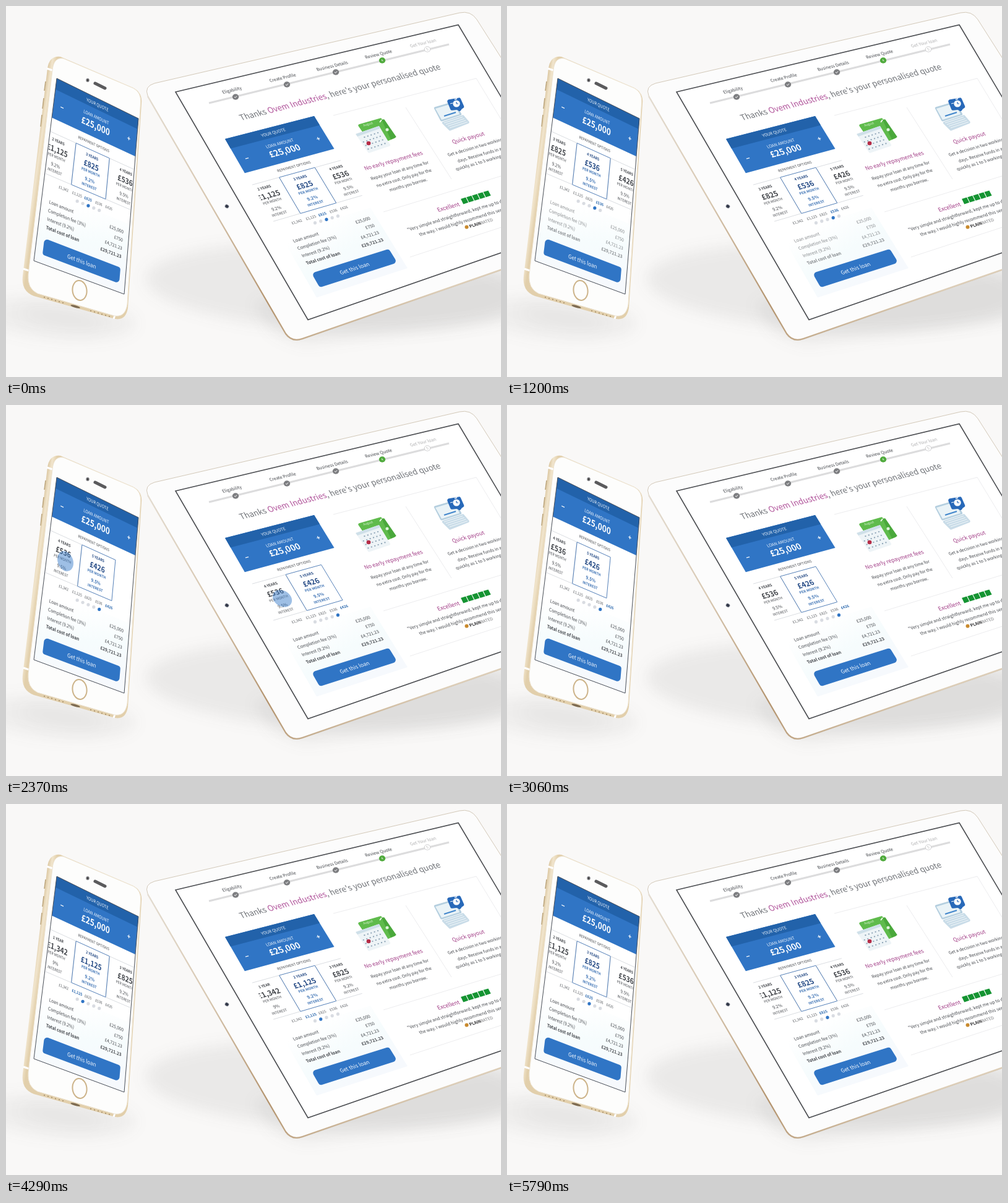
An HTML page with a canvas for the animation above (5.82 s loop, 800x600 px).

```html
<!DOCTYPE html>
<html lang="en">
<head>
<meta charset="utf-8">
<title>Loan quote on two devices</title>
<style>
html, body { margin: 0; width: 100%; height: 100%; overflow: hidden; background: #f9f8f7; }
canvas { display: block; width: 800px; height: 600px; }
</style>
</head>
<body>
<canvas id="stage" width="800" height="600"></canvas>
<script>
const FONT = '"Noto Sans CJK SC", "Noto Sans CJK JP", "Noto Sans CJK", Lato, sans-serif';
const LOOP = 5820, W = 300, H = 534, PITCH = 120, MID = 152;
const BLUE = '#3075c5', DEEP = '#2262aa', INK = '#44474c', PURPLE = '#a03a84';
const view = document.getElementById('stage').getContext('2d');
const layer = document.createElement('canvas');
layer.width = 800;
layer.height = 600;
let g = layer.getContext('2d');

// Corners run clockwise from the top left of each quote card.
const phone = [[82, 117], [214, 182], [191, 466], [45, 412]];
const tablet = [[354, 215], [498, 178], [649, 424], [502, 471.6]];

const options = [
  ['1 YEAR', '£1,342', '9%'], ['2 YEARS', '£1,125', '9.2%'], ['3 YEARS', '£825', '9.2%'],
  ['4 YEARS', '£536', '9.5%'], ['5 YEARS', '£426', '9.5%']
];
const costs = [
  ['Loan amount', '£25,000'], ['Completion fee (3%)', '£750'],
  ['Interest (9.2%)', '£4,721.23'], ['Total cost of loan', '£29,721.23']
];
const priceAt = [68, 115, 153, 190, 225];
const swipes = [
  { at: 60, from: 2, to: 3, reach: 95, touch: 159 },
  { at: 1500, from: 3, to: 4, reach: 95, touch: 159 },
  { at: 3060, from: 4, to: 1, reach: 170, touch: 75 },
  { at: 4410, from: 1, to: 2, reach: 95, touch: 159 }
];

const clamp = x => Math.max(0, Math.min(1, x));
const ramp = (t, a, b) => clamp((t - a) / (b - a));

// Affine frame of a bilinear card around (u, v).
function local([a, b, c, d], u, v) {
  const s = u / W, t = v / H;
  const axis = i => {
    const k = a[i] - b[i] + c[i] - d[i];
    return {
      p: a[i] + s * (b[i] - a[i]) + t * (d[i] - a[i]) + s * t * k,
      du: (b[i] - a[i] + t * k) / W,
      dv: (d[i] - a[i] + s * k) / H
    };
  };
  const x = axis(0), y = axis(1);
  return [x.du, y.du, x.dv, y.dv, x.p, y.p];
}

const at = (dev, u, v) => local(dev, u, v).slice(4);
const box = (dev, u0, v0, u1, v1) =>
  [[u0, v0], [u1, v0], [u1, v1], [u0, v1]].map(([u, v]) => at(dev, u, v));

function trace(pts, r = 0) {
  g.beginPath();
  if (!r) {
    pts.forEach(p => g.lineTo(p[0], p[1]));
  } else {
    const n = pts.length, z = pts[n - 1];
    g.moveTo((z[0] + pts[0][0]) / 2, (z[1] + pts[0][1]) / 2);
    pts.forEach((p, i) => {
      const q = pts[(i + 1) % n];
      g.arcTo(p[0], p[1], q[0], q[1], r);
    });
  }
  g.closePath();
}

function fill(pts, color, r) {
  trace(pts, r);
  g.fillStyle = color;
  g.fill();
}

function outline(pts, color, width = 1) {
  trace(pts);
  g.strokeStyle = color;
  g.lineWidth = width;
  g.stroke();
}

function line(pts, color, width = 1) {
  g.beginPath();
  pts.forEach(p => g.lineTo(p[0], p[1]));
  g.strokeStyle = color;
  g.lineWidth = width;
  g.stroke();
}

function oval(x, y, rx, ry, color, turn = 0) {
  g.beginPath();
  g.ellipse(x, y, rx, ry, turn, 0, 7);
  g.fillStyle = color;
  g.fill();
}

function blend(x0, y0, x1, y1, ...colors) {
  const grad = g.createLinearGradient(x0, y0, x1, y1);
  colors.forEach((c, i) => grad.addColorStop(i / (colors.length - 1), c));
  return grad;
}

// Text lying in a card, centred vertically on (u, v).
function put(dev, text, u, v, size, color, weight = 400, align = 'center') {
  g.save();
  g.transform(...local(dev, u, v));
  g.font = `${weight} ${size}px ${FONT}`;
  g.textAlign = align;
  g.fillStyle = color;
  g.fillText(text, 0, size * 0.36);
  g.restore();
}

// Text lying on the tablet page; parts are [text, color, weight].
function page(parts, x, y, size, slope, align = 'center') {
  if (typeof parts[0] === 'string') parts = [parts];
  g.save();
  const n = Math.hypot(1, slope);
  g.transform(1 / n, slope / n, 0.54, 0.93, x, y);
  g.textAlign = align;
  let pen = 0;
  for (const [text, color, weight = 400] of parts) {
    g.font = `${weight} ${size}px ${FONT}`;
    g.fillStyle = color;
    g.fillText(text, pen, size * 0.36);
    pen += g.measureText(text).width;
  }
  g.restore();
}

function backdrop() {
  g.fillStyle = '#f9f8f7';
  g.fillRect(0, 0, 800, 600);
  g.save();
  g.filter = 'blur(12px)';
  oval(85, 505, 125, 34, 'rgba(70,70,70,.06)', 0.08);
  oval(90, 505, 70, 16, 'rgba(70,70,70,.04)', 0.15);
  oval(530, 455, 305, 70, 'rgba(70,70,70,.08)', 0.05);
  fill([[400, 480], [830, 420], [830, 505], [620, 530], [480, 548], [435, 530]], 'rgba(70,70,70,.07)');
  g.restore();
}

function phoneBody() {
  g.beginPath();
  g.moveTo(67, 101);
  g.quadraticCurveTo(70, 80, 88, 82);
  g.lineTo(205, 132);
  g.quadraticCurveTo(221, 140, 219, 158);
  g.lineTo(197, 488);
  g.quadraticCurveTo(194, 509, 176, 506);
  g.lineTo(45, 469);
  g.quadraticCurveTo(24, 461, 27, 436);
  g.closePath();
  g.fillStyle = blend(42, 270, 56, 272, '#d9c39b', '#f1e5cd', '#e2cfab');
  g.fill();
  line([[66, 101], [75, 104]], '#fff', 3);
  line([[28, 425], [37, 428]], '#fff', 3);
  line([[176, 500], [174, 506]], '#fff', 3);

  g.beginPath();
  g.moveTo(75, 104);
  g.quadraticCurveTo(77, 82, 93, 85);
  g.lineTo(206, 133);
  g.quadraticCurveTo(219, 140, 217.5, 157);
  g.lineTo(196, 482);
  g.quadraticCurveTo(193, 504, 175, 501);
  g.lineTo(51, 465);
  g.quadraticCurveTo(34, 457, 36, 434);
  g.closePath();
  g.fillStyle = '#fdfdfc';
  g.fill();
  g.strokeStyle = '#eee5d4';
  g.lineWidth = 1;
  g.stroke();

  [[64, 122, 62, 137], [61, 149, 59, 166], [58, 176, 56, 195]].forEach(
    ([a, b, c, d]) => line([[a, b], [c, d]], '#bda67d', 1.6));
  g.lineCap = 'round';
  line([[144, 125], [160, 133]], '#5b5b5d', 5);
  g.lineCap = 'butt';
  oval(132, 120, 2.7, 3, '#77777b');
  oval(132, 120, 1.2, 1.3, '#333');
  g.beginPath();
  g.ellipse(119, 460, 11.5, 16, -0.12, 0, 7);
  g.strokeStyle = '#cdb48a';
  g.lineWidth = 2;
  g.stroke();
  for (let i = 0; i < 6; i++) {
    oval(62 + i * 6, 471 + i * 1.8, 1, 1, '#a18a66');
    oval(137 + i * 6, 493 + i * 1.8, 1, 1, '#a18a66');
  }
  oval(112, 486, 8, 1.8, '#7d6b52', 0.28);
  fill(phone, '#fff');
}

function tabletBody() {
  g.beginPath();
  g.moveTo(240, 125);
  g.lineTo(733, 11);
  g.quadraticCurveTo(751, 7, 761, 22);
  g.lineTo(810, 99);
  g.lineTo(810, 424);
  g.lineTo(479, 539);
  g.quadraticCurveTo(462, 545, 452, 530);
  g.lineTo(229, 145);
  g.quadraticCurveTo(223, 130, 240, 125);
  g.fillStyle = '#fcfcfc';
  g.fill();
  g.strokeStyle = '#d3c9b9';
  g.lineWidth = 1;
  g.stroke();
  g.beginPath();
  g.moveTo(229, 146);
  g.lineTo(452, 530);
  g.quadraticCurveTo(462, 544, 479, 538);
  g.lineTo(810, 423);
  g.strokeStyle = blend(230, 140, 640, 530, '#e4ddd2', '#d8c8b2', '#b3936d', '#dccdb7');
  g.lineWidth = 2.3;
  g.stroke();
  oval(357, 324, 3.7, 3.2, '#b9bcc4', 0.5);
  oval(357, 324, 2.8, 2.4, '#333949', 0.5);
  const screen = [[274, 139], [731, 30.5], [812, 167], [812, 395], [488, 507.5]];
  fill(screen, '#fff');
  outline(screen, '#4b4d51', 1.6);
}

function progress() {
  line([[328, 157], [716, 62]], '#dcdcdd', 3);
  const steps = [
    ['Eligability', 365, 136, 371, 147], ['Create Profile', 447, 116, 454, 127],
    ['Business Details', 527, 97, 533, 107], ['Review Quote', 602, 78, 608, 88],
    ['Get Your loan', 674, 60, 681, 70]
  ];
  steps.forEach(([name, x, y, cx, cy], i) => {
    page([name, i > 3 ? '#b0b0b2' : INK, i > 3 ? 400 : 500], x, y, 6.9, -0.24);
    oval(cx, cy, 5.2, 4.7, i > 3 ? '#cfcfd1' : i > 2 ? '#4faa3c' : '#7d7e81');
    if (i > 3) oval(cx, cy, 4.2, 3.7, '#fff');
    if (i > 2) page([String(i + 1), i > 3 ? '#aaa' : '#fff'], cx, cy, 5, -0.24);
    else line([[cx - 2, cy], [cx - 0.5, cy + 1.5], [cx + 2, cy - 1.5]], '#fff', 1);
  });
}

function calendar() {
  fill([[568, 192], [606, 181], [630, 213], [593, 228]], '#5fbb4c', 2);
  fill([[607, 184], [611, 183], [631, 212], [622, 216]], '#4aa83b', 1);
  page(['August', '#dff3da'], 585, 191, 5, -0.28);
  fill([[565, 207], [603, 194], [622, 226], [586, 238]], '#eef4f7', 2);
  fill([[565, 207], [603, 194], [605, 198], [568, 211]], '#cfe0e9');
  for (let r = 0; r < 4; r++) {
    for (let c = 0; c < 6; c++) {
      if (r + c) oval(574 + c * 5.4 + r * 3.8, 214 - c * 1.8 + r * 5.8, 1.2, 1.1, '#8fa5b7');
    }
  }
  oval(586, 222, 3.4, 3.2, '#b52c47');
  oval(616, 200, 2.5, 2.5, '#dff3da');
  line([[604, 188], [607, 184]], '#fff', 1.5);
}

function laptop() {
  fill([[691, 164], [725, 154], [737, 176], [703, 187]], '#b5cfdf', 2);
  fill([[694, 166], [724, 157], [733, 175], [704, 184]], '#eaf3f7');
  line([[708, 178], [727, 172]], '#4286cb', 2);
  fill([[703, 188], [739, 176], [750, 189], [717, 202]], '#c9dce8', 2);
  for (let r = 0; r < 4; r++) {
    line([[708 + r * 3, 189 + r * 2.7], [738 + r * 2.6, 179.5 + r * 2.7]], '#f1f7fa', 1);
  }
  fill([[712, 152], [734, 148], [741, 164], [736, 167], [735, 172], [729, 168], [719, 169]], '#2869b9', 3);
  oval(728, 158, 5.7, 5.5, '#fff');
  line([[725, 151], [729, 150]], '#fff', 1.5);
  line([[728, 155], [728, 158], [731, 158]], '#2869b9', 1.2);
  line([[718, 158], [722, 157]], '#fff', 1);
}

function pageText() {
  const head = '#707378', rule = '#ececee';
  page([['Thanks ', head, 300], ['Ovem Industries', '#b0539a', 300],
    [", here's your personalised quote", head, 300]], 378, 181, 12.8, -0.258, 'left');
  line([[529, 177], [760, 117], [800, 183]], rule);
  line([[646, 164], [720, 280]], rule);
  line([[610, 333], [800, 275]], rule);
  line([[653, 406], [800, 358]], rule);
  calendar();
  laptop();
  page(['No early repayment fees', PURPLE, 500], 626, 250, 8.6, -0.275);
  page(['Repay your loan at any time for', INK], 636, 266, 6.7, -0.29);
  page(['no extra cost. Only pay for the', INK], 643, 278, 6.7, -0.29);
  page(['months you borrow.', INK], 650, 289, 6.7, -0.29);
  page(['Quick payout', PURPLE, 500], 747, 213, 8.6, -0.275);
  page(['Get a decision in two working', INK], 714, 241, 6.7, -0.29, 'left');
  page(['days. Receive funds in as', INK], 730, 251, 6.7, -0.29, 'left');
  page(['quickly as 1 to 3 working days.', INK], 727, 264, 6.7, -0.29, 'left');
  page(['Excellent', PURPLE, 500], 715, 325, 8.8, -0.28);
  for (let i = 0; i < 5; i++) {
    const x = 735 + i * 9.1, y = 312 - i * 2.8;
    fill([[x, y], [x + 8, y - 2.4], [x + 12.2, y + 5.8], [x + 4.2, y + 8.4]], '#159432');
  }
  page(['"Very simple and straightforward, kept me up to date all', INK], 649, 362, 6.9, -0.305, 'left');
  page(['the way. I would highly recommend this service."', INK], 668, 370, 6.9, -0.305, 'left');
  oval(744.5, 357.5, 3, 3, '#c98a2e');
  page([['PLAIN', '#2c2c2e', 700], ['RATED', '#77787b', 300]], 749, 356.5, 6.5, -0.3, 'left');
}

function card(dev) {
  const pale = blend(...at(dev, 150, 320), ...at(dev, 150, H), '#fff', '#f6fcfd', '#f6f9fd');
  fill(box(dev, 0, 322, W, H), pale);
  fill(box(dev, 0, 0, W, 115), BLUE);
  fill(box(dev, 0, 0, W, 32), DEEP);
  put(dev, 'YOUR QUOTE', 152, 18, 13, '#f2f7fd');
  put(dev, 'LOAN AMOUNT', 152, 55, 13.2, '#f2f7fd');
  put(dev, '£25,000', 153, 81, 26.5, '#fff', 700);
  put(dev, '–', 31, 72, 24, '#fff', 700);
  put(dev, '+', 272, 72, 20, '#fff', 700);
  put(dev, 'REPAYMENT OPTIONS', 153, 135, 10.9, INK);
  fill(box(dev, 25, 460, 281, 508), BLUE, 5);
  put(dev, 'Get this loan', 153, 485, 16.5, '#f4f8fd');
}

function state(t) {
  const s = swipes.filter(w => w.at <= t).pop();
  if (!s) return { offset: 2 * PITCH, active: 2, rows: 1, press: 0, touch: 0 };
  const e = t - s.at, dir = Math.sign(s.to - s.from);
  const drag = s.reach * ramp(e, 90, 860);
  const snap = 1 - (1 - ramp(e, 860, 1080)) ** 3;
  const full = Math.abs(s.to - s.from) * PITCH;
  return {
    offset: s.from * PITCH + dir * (drag + (full - drag) * snap),
    active: e < 860 ? s.from : s.to,
    rows: 1 - 0.75 * (ramp(e, 960, 1080) - ramp(e, 1080, 1200)),
    press: ramp(e, 0, 100) - ramp(e, 860, 960),
    touch: s.touch - dir * drag
  };
}

function option(dev, i, u, on) {
  const [term, price, rate] = options[i];
  const dark = on ? '#274c86' : INK, tint = on ? '#3a70b3' : INK, weight = on ? 700 : 400;
  outline(box(dev, u - 59.5, 155, u + 59.5, 278), on ? '#5580b8' : '#dadde1');
  put(dev, term, u, 173, 11.2, dark, 700);
  put(dev, price, u, 199, 22.5, dark, 700);
  put(dev, 'PER MONTH', u, 219, 10.8, tint, weight);
  put(dev, rate, u, 243, 13.5, tint, weight);
  put(dev, 'INTEREST', u, 261, 10.8, tint, weight);
}

function quote(dev, s) {
  const place = i => MID + i * PITCH - s.offset;
  g.save();
  trace(box(dev, 2, 145, W - 2, 290));
  g.clip();
  options.forEach((o, i) => {
    if (i !== s.active) option(dev, i, place(i), false);
  });
  option(dev, s.active, place(s.active), true);
  g.restore();

  options.forEach((o, i) => {
    const on = i === s.active;
    put(dev, o[1], priceAt[i], 299, 11, on ? DEEP : '#55585d', on ? 700 : 400);
    oval(...at(dev, 118 + i * 19, 318), 2.6, 2.7, on ? BLUE : '#d9dce2');
  });

  g.globalAlpha = s.rows;
  costs.forEach(([name, sum], i) => {
    const v = 352 + i * 25, weight = i === 3 ? 700 : 400;
    put(dev, name, 26, v, 13.5, INK, weight, 'left');
    put(dev, sum, 281, v, 13.3, INK, weight, 'right');
  });

  if (s.press > 0) {
    g.globalAlpha = s.press * 0.55;
    g.save();
    g.transform(...local(dev, s.touch, 222));
    oval(0, 0, 28, 28, '#3a7cca');
    g.restore();
  }
  g.globalAlpha = 1;
}

backdrop();
tabletBody();
progress();
pageText();
card(tablet);
phoneBody();
card(phone);
outline(phone, '#4a4f58', 1);

g = view;
const start = performance.now();
function frame(now) {
  const s = state(Math.max(0, now - start) % LOOP);
  g.drawImage(layer, 0, 0);
  quote(tablet, s);
  quote(phone, s);
  requestAnimationFrame(frame);
}
frame(start);
</script>
</body>
</html>
```
